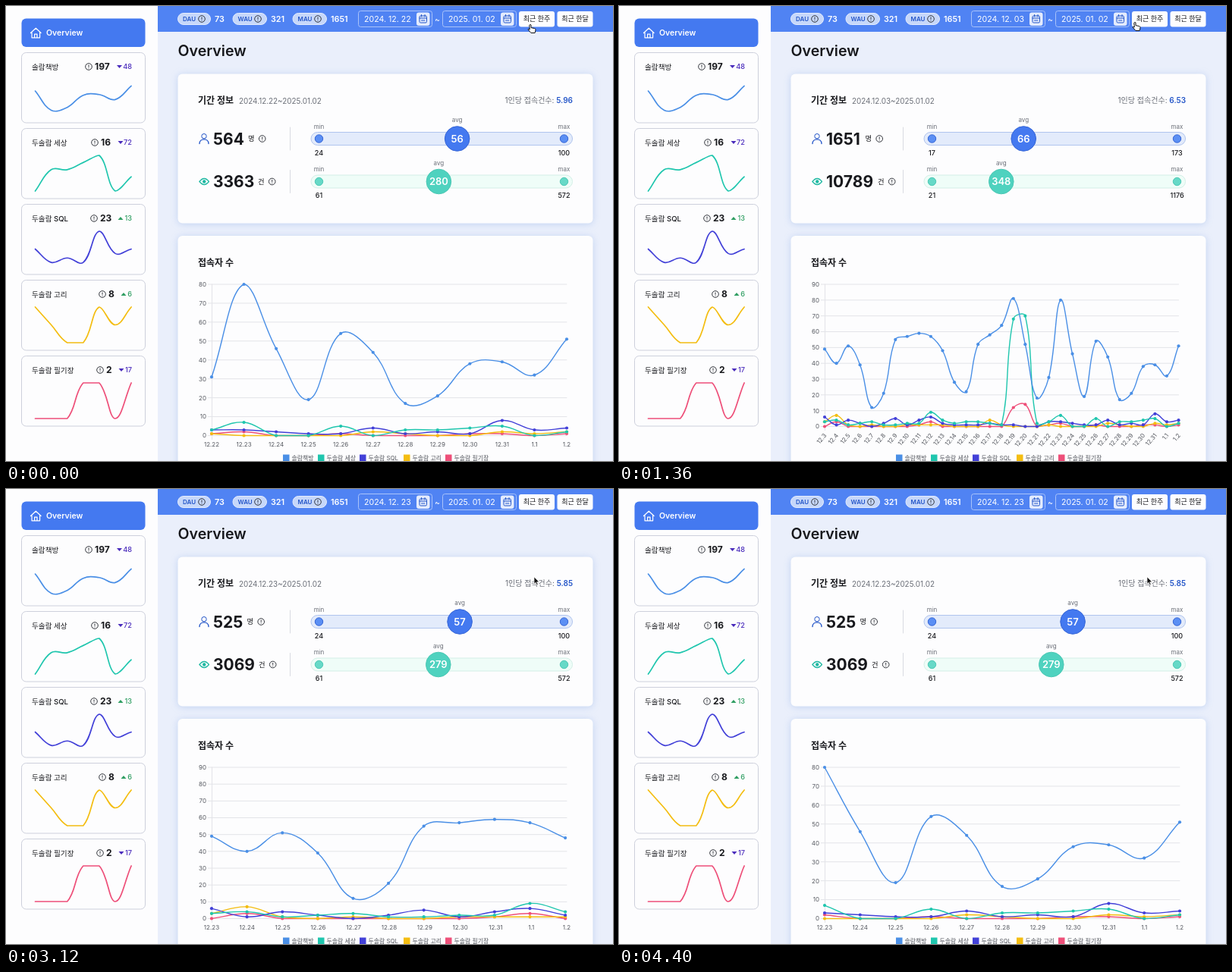
Recreate the animation shown at these times as an HTML page. Size 800 by 600 pixels, loop 4.48 s.

```html
<!DOCTYPE html>
<html lang="ko">
<head>
<meta charset="utf-8">
<title>Overview</title>
<style>
html, body { margin: 0; width: 100%; height: 100%; overflow: hidden; background: #fdfdfe; }
svg { display: block; font-family: Inter, 'Noto Sans CJK KR', 'Noto Sans CJK', 'Noto Sans', sans-serif; }
text { white-space: pre; }
.panel { fill: #fdfdfe; filter: drop-shadow(0 1px 5px rgba(90, 140, 220, .28)); }
.popup { fill: #fff; stroke: #c4c8d0; filter: drop-shadow(0 2px 4px rgba(0, 0, 0, .35)); }
</style>
</head>
<body>
<svg width="800" height="600" viewBox="0 0 800 600"><g id="base"></g><g id="live"></g></svg>
<script>
const LOOP = 4480, MORPH = 600;
const BLUE = '#4479f0', DEEP = '#2355c8', INK = '#17181c', GREY = '#6b6f78';

const sparse = values => Array.from({ length: 31 }, (_, i) => values[i] || 0);
// Daily visitors, 12.3 to 1.2
const series = [
  { name: '솔람책방', color: '#4a8fe6', data: [49, 40, 51, 39, 12, 21, 55, 57, 59, 57, 48, 28, 22, 52, 58, 64,
    81, 52, 18, 31, 80, 46, 19, 54, 44, 17, 21, 38, 39, 32, 51] },
  { name: '두솔람 세상', color: '#1fc6ae', data: [3, 4, 1, 2, 3, 1, 1, 2, 2, 9, 4, 2, 3, 3, 2, 1,
    68, 70, 2, 3, 7, 0, 0, 5, 0, 3, 3, 4, 5, 0, 2] },
  { name: '두솔람 SQL', color: '#4240d8', data: [6, 1, 4, 2, 0, 2, 5, 1, 4, 6, 2, 1, 1, 1, 2, 1,
    1, 0, 0, 3, 3, 2, 1, 1, 4, 1, 2, 1, 8, 3, 4] },
  { name: '두솔람 고리', color: '#f4bd10', data: sparse({ 0: 3, 1: 7, 2: 1, 4: 1, 7: 1, 8: 1, 9: 1, 10: 1, 14: 4,
    15: 1, 19: 1, 24: 2, 25: 1, 28: 2, 29: 1, 30: 2 }) },
  { name: '두솔람 필기장', color: '#ee4f79', data: sparse({ 1: 3, 8: 1, 9: 3, 16: 12, 17: 14, 19: 1, 20: 2, 23: 1,
    27: 1, 28: 1, 30: 1 }) }
];

// first: first label's day, from: first value's day
const scenes = [
  { at: -MORPH, n: 12, first: 19, from: 19, max: 80, bottom: 566.5, right: 739 },
  { at: 330, n: 31, first: 0, from: 0, max: 90, bottom: 554.5, right: 737.5 },
  { at: 2688, n: 11, first: 20, from: 0, max: 90, bottom: 566.5, right: 739 },
  { at: 3492, n: 11, first: 20, from: 20, max: 80, bottom: 566.5, right: 739 }
];
const stats = [
  { at: 0, ratio: '5.96', rows: [['564', 319, 24, 56, 100], ['3363', 332, 61, 280, 572]] },
  { at: 330, ratio: '6.53', rows: [['1651', 324.5, 17, 66, 173], ['10789', 341, 21, 348, 1176]] },
  { at: 3000, ratio: '5.85', rows: [['525', 317.5, 24, 57, 100], ['3069', 333, 61, 279, 572]] }
];
// time, x, y of the pointer's tip
const path = [[0, 691, 25], [270, 739, 23], [1000, 739, 23], [1360, 680, 22], [1600, 550, 17], [1780, 550, 17],
  [2300, 497, 143], [2680, 497, 143], [3040, 696, 116], [LOOP, 696, 116]];
const POPUP = [1760, 2688];

const txt = (x, y, s, size, fill = INK, weight = 400, anchor = 'start', more = '') =>
  `<text x="${x}" y="${y}" font-size="${size}" fill="${fill}" font-weight="${weight}" text-anchor="${anchor}" ${more}>${s}</text>`;
const box = (x, y, w, h, r, fill, stroke = 'none', more = '') =>
  `<rect x="${x}" y="${y}" width="${w}" height="${h}" rx="${r}" fill="${fill}" stroke="${stroke}" ${more}/>`;
const dot = (x, y, r, fill, stroke = 'none') =>
  `<circle cx="${x}" cy="${y}" r="${r}" fill="${fill}" stroke="${stroke}"/>`;
const line = (d, color, width = 1, fill = 'none') =>
  `<path d="${d}" fill="${fill}" stroke="${color}" stroke-width="${width}" stroke-linecap="round" stroke-linejoin="round"/>`;
const info = (x, y) => dot(x, y, 4.3, 'none', '#33363d') + line(`M${x} ${y - 2}v2.2m0 1.7v.1`, '#33363d', 1);
const last = (list, t) => list.filter(item => item.at <= t).pop();
const clamp = (v, a, b) => Math.min(b, Math.max(a, v));

// Bezier spline with tension .4, handles kept inside the plot
function spline(pts, top, bottom) {
  const handles = pts.map((p, i) => {
    const a = pts[i - 1] || p, b = pts[i + 1] || p;
    const da = Math.hypot(p[0] - a[0], p[1] - a[1]), db = Math.hypot(b[0] - p[0], b[1] - p[1]);
    const k = .4 / (da + db || 1);
    const at = s => [p[0] + s * (b[0] - a[0]), clamp(p[1] + s * (b[1] - a[1]), top, bottom)];
    return [at(-k * da), at(k * db)];
  });
  return pts.map((p, i) => i ? `C${handles[i - 1][1]} ${handles[i][0]} ${p}` : `M${p}`).join('');
}

function sidebar() {
  const cards = [
    ['197', 109, 48, 149.5], ['16', 117, 72, 151], ['23', 116, 13, 151, 1], ['8', 127, 6, 155, 1], ['2', 124, 17, 152]
  ];
  const scales = [[10, 60], [0, 5], [0, 8], [0, 2], [0, 1]];
  let out = box(20.5, 16.5, 163, 37.5, 6, BLUE) +
    line('M32.5 35.5l6.8-6.3 6.8 6.3M34 34.5v7.3h10.6v-7.3M37.6 41.5v-4.4h3.4v4.4', '#fff', 1.2) +
    txt(53, 39, 'Overview', 10.5, '#fff', 600);
  cards.forEach(([count, ix, delta, tx, up], i) => {
    const y = 100 * i, [lo, hi] = scales[i], s = series[i];
    const pts = s.data.slice(-7).map((v, j) => [38.5 + 21.1 * j, 144 + y - 47 * (v - lo) / (hi - lo)]);
    const color = up ? '#2f9e62' : '#4a2cbc', d = up ? -1 : 1;
    out += box(20.5, 61.5 + y, 163, 92.5, 6, '#fdfdfe', '#cdd0dc') +
      txt(34, 83.5 + y, s.name, 9.6, INK, 500) + info(ix, 80 + y) +
      txt(ix + 8, 84.3 + y, count, 12, INK, 700) +
      `<path d="M${tx - 3.5} ${80 + y - d * 2}h7l-3.5 ${d * 4}z" fill="${color}"/>` +
      txt(166, 83.3 + y, delta, 9.2, color, 500, 'end') +
      line(spline(pts, 97 + y, 144 + y), s.color, 1.7);
  });
  return out;
}

function header() {
  let out = box(200, 0, 600, 600, 0, '#eaeffb') + box(200, 0, 600, 34, 0, '#5083f3');
  [['DAU', 226, '73'], ['WAU', 298.5, '321'], ['MAU', 377.5, '1651']].forEach(([s, x, n], i) => {
    const w = i ? 45.5 : 44;
    out += box(x + .5, 9.5, w - 1, 15, 7.5, '#c6d7fa', '#e4ecfd') + txt(x + 7, 20, s, 8, DEEP, 600) +
      info(x + w - 12, 17) + txt(x + w + 5, 21, n, 10.8, '#fff', 600);
  });
  [464.5, 575.5].forEach(x => {
    out += box(x, 6.5, 97, 21, 3, 'none', '#a9c3fa') + box(x + 76.5, 8.5, 17.5, 17.5, 3, '#e3ebfd') +
      box(x + 80.5, 13, 9.5, 9, 1.5, 'none', DEEP) +
      line(`M${x + 80.5} 16h9.5M${x + 83} 11.5v2.5m4.5-2.5v2.5M${x + 83} 19h4.5`, DEEP);
  });
  out += txt(568.5, 21, '~', 10, '#fff', 500, 'middle') + txt(583, 21, '2025. 01. 02', 10.6, '#fff', 400);
  [['최근 한주', 676], ['최근 한달', 726.5]].forEach(([s, x]) =>
    out += box(x, 7, 47, 20.5, 3, '#fdfdfe') + txt(x + 23.5, 20.3, s, 9, INK, 500, 'middle'));
  return out;
}

function panels() {
  let out = txt(226.5, 66, 'Overview', 19.6, INK, 600) +
    '<rect class="panel" x="226.5" y="89.5" width="547" height="197" rx="6"/>' +
    '<rect class="panel" x="226.5" y="303" width="547" height="320" rx="6"/>' +
    txt(253, 129, '기간 정보', 12, INK, 700) + txt(253, 342.5, '접속자 수', 12, INK, 700);
  [[175, '#e3ebfb', '#b0c4ee'], [231.5, '#effdf8', '#d3efe7']].forEach(([y, fill, stroke]) =>
    out += line(`M374.5 ${y - 15}v30`, '#d9dbe2') + box(402, y - 8.5, 344.5, 17, 8.5, fill, stroke));
  out += dot(261, 171.7, 3.2, 'none', DEEP) + line('M255 181.5c0-7.5 12-7.5 12 0', DEEP, 1.4) +
    line('M255 231.5q6.2-8 12.4 0q-6.2 8-12.4 0z', '#1fb9a2', 1.4) + dot(261.2, 231.5, 2.2, '#1fb9a2');
  [365, 411, 466, 524, 579].forEach((x, i) =>
    out += box(x, 591.5, 8.5, 9, 0, series[i].color) + txt(x + 11.5, 599, series[i].name, 7.9, '#55585f'));
  return out;
}

function summary(t) {
  const now = last(stats, t), day = ['22', '03', '23'][Math.min(2, scenes.indexOf(last(scenes, t)))];
  let out = txt(472, 21, `2024. 12. ${day}`, 10.6, '#fff') +
    txt(307, 128.5, `2024.12.${day}~2025.01.02`, 9.9, GREY) +
    txt(747, 128.3, `1인당 접속건수: <tspan fill="${DEEP}" font-weight="600">${now.ratio}</tspan>`, 10, GREY, 400, 'end');
  now.rows.forEach(([total, ux, min, avg, max], i) => {
    const y = i ? 231.5 : 175, x = 402 + 344 * avg / max;
    const [fill, edge] = i ? ['#4fd2bf', '#49c7b3'] : [BLUE, '#3565d6'];
    out += txt(273, y + 7.8, total, 21, INK, 700) + txt(ux, y + 3.3, i ? '건' : '명', 9.3, INK, 500) +
      info(ux + 18.7, y);
    [['min', min, 412.5], ['max', max, 735.5]].forEach(([s, v, cx]) =>
      out += dot(cx, y, 5.2, i ? '#66d9c7' : '#5b8ff4', edge) + txt(cx, y - 13.2, s, 8, GREY, 400, 'middle') +
        txt(cx, y + 21.8, v, 9, INK, 500, 'middle'));
    out += dot(x, y, 16.3, fill, edge) + txt(x, y + 4.7, avg, 13, '#fff', 600, 'middle') +
      txt(x, y - 22, 'avg', 8, GREY, 400, 'middle');
  });
  return out;
}

const plotX = (s, i) => 271 + (s.right - 271) * i / (s.n - 1);
const plotY = (s, v) => s.bottom - (s.bottom - 367) * v / s.max;

function chart(t) {
  const now = last(scenes, t), before = scenes[scenes.indexOf(now) - 1] || now;
  const ease = 1 - (1 - clamp((t - now.at) / MORPH, 0, 1)) ** 4;
  const mix = (a, b) => +(a + (b - a) * ease).toFixed(2);
  let out = '';
  for (let v = 0; v <= now.max; v += 10) {
    const y = plotY(now, v);
    out += line(`M266 ${y}H${now.right}`, '#e3e4e8') + txt(264, y + 2.9, v, 8, '#55585f', 400, 'end');
  }
  out += line(`M271.5 367V${now.bottom + 5}`, '#e3e4e8');
  for (let i = 0; i < now.n; i++) {
    const d = now.first + i, x = plotX(now, i), label = d < 29 ? `12.${d + 3}` : `1.${d - 28}`;
    out += now.n > 20
      ? txt(0, 0, label, 8, '#55585f', 400, 'end', `transform="translate(${x + 3} 566.5) rotate(-50)"`)
      : txt(x, 581, label, 8, '#55585f', 400, 'middle');
  }
  [...series].reverse().forEach(({ data, color }) => {
    const pts = Array.from({ length: now.n }, (_, i) => {
      const x = plotX(now, i), y = plotY(now, data[now.from + i]), old = i < before.n;
      return [mix(old ? plotX(before, i) : x, x), mix(old ? plotY(before, data[before.from + i]) : now.bottom, y)];
    });
    out += line(spline(pts, 367, now.bottom), color, 1.4) + pts.map(([x, y]) => dot(x, y, 2.1, color)).join('');
  });
  return out;
}

function calendar(x, y) {
  let out = '<rect class="popup" x="464.5" y="27.5" width="145" height="187"/>' +
    txt(472, 46, '2024년 12월', 8.2, INK, 700) + '<path d="M517 42h5l-2.5 3z"/>' +
    line('M571.5 48.5v-9.5m-4 4l4-4 4 4M593 39v9.5m-4-4l4 4 4-4', INK, 1.1) +
    txt(479, 203.5, '삭제', 7.8, DEEP) + txt(595, 203.5, '오늘', 7.8, DEEP, 400, 'end');
  const col = c => 481 + 18.6 * c;
  [...'일월화수목금토'].forEach((s, c) => out += txt(col(c), 70.5, s, 7.8, INK, 500, 'middle'));
  const hover = Math.round((x - 481) / 18.6) + 7 * Math.round((y - 87) / 18.6);
  for (let i = 0; i < 42; i++) {
    const cx = col(i % 7), cy = 87 + 18.6 * Math.floor(i / 7);
    const cell = (fill, stroke) => box(cx - 9, cy - 9, 18, 18, 1, fill, stroke);
    if (i === 2) out += cell('#3265dc', '#1d3f94');
    else if (i === hover && y > 78) out += cell('#a9c4f6', '#5577b5');
    else if (i === 32) out += cell('none', '#777a80');
    out += txt(cx, cy + 2.8, i < 31 ? i + 1 : i - 30, 7.8, i === 2 ? '#fff' : i < 31 ? INK : i === 32 ? '#55585f' : '#a0a3a9',
      i < 31 ? 500 : 400, 'middle');
  }
  return out;
}

function pointerAt(t) {
  const i = path.findIndex(p => p[0] > t), [t0, x0, y0] = path[i - 1], [t1, x1, y1] = path[i];
  const p = (t - t0) / (t1 - t0), e = p * p * (3 - 2 * p);
  return [x0 + (x1 - x0) * e, y0 + (y1 - y0) * e];
}

function pointer(x, y) {
  const hand = y < 28 && x > 675;
  const shape = hand
    ? line('M-1 0q1-1.2 2 0v3.6l4.6 1q1.6.4 1.4 2l-.9 3.9h-5.2l-3.8-4.4q-.5-1.5 1.9-.3z', '#111', 1, '#fff')
    : line('M0 0v9.2l2.1-1.9 1.5 3.3 1.6-.7-1.5-3.2h2.9z', '#fff', .7, '#111');
  return `<g transform="translate(${x} ${y})">${shape}</g>`;
}

const base = document.getElementById('base'), live = document.getElementById('live');
base.innerHTML = header() + sidebar() + panels();

const start = performance.now();
function frame() {
  const t = (performance.now() - start) % LOOP, [x, y] = pointerAt(t);
  const open = t >= POPUP[0] && t < POPUP[1];
  live.innerHTML = summary(t) + chart(t) + (open ? calendar(x, y) : '') + pointer(x, y);
  requestAnimationFrame(frame);
}
frame();
</script>
</body>
</html>
```
